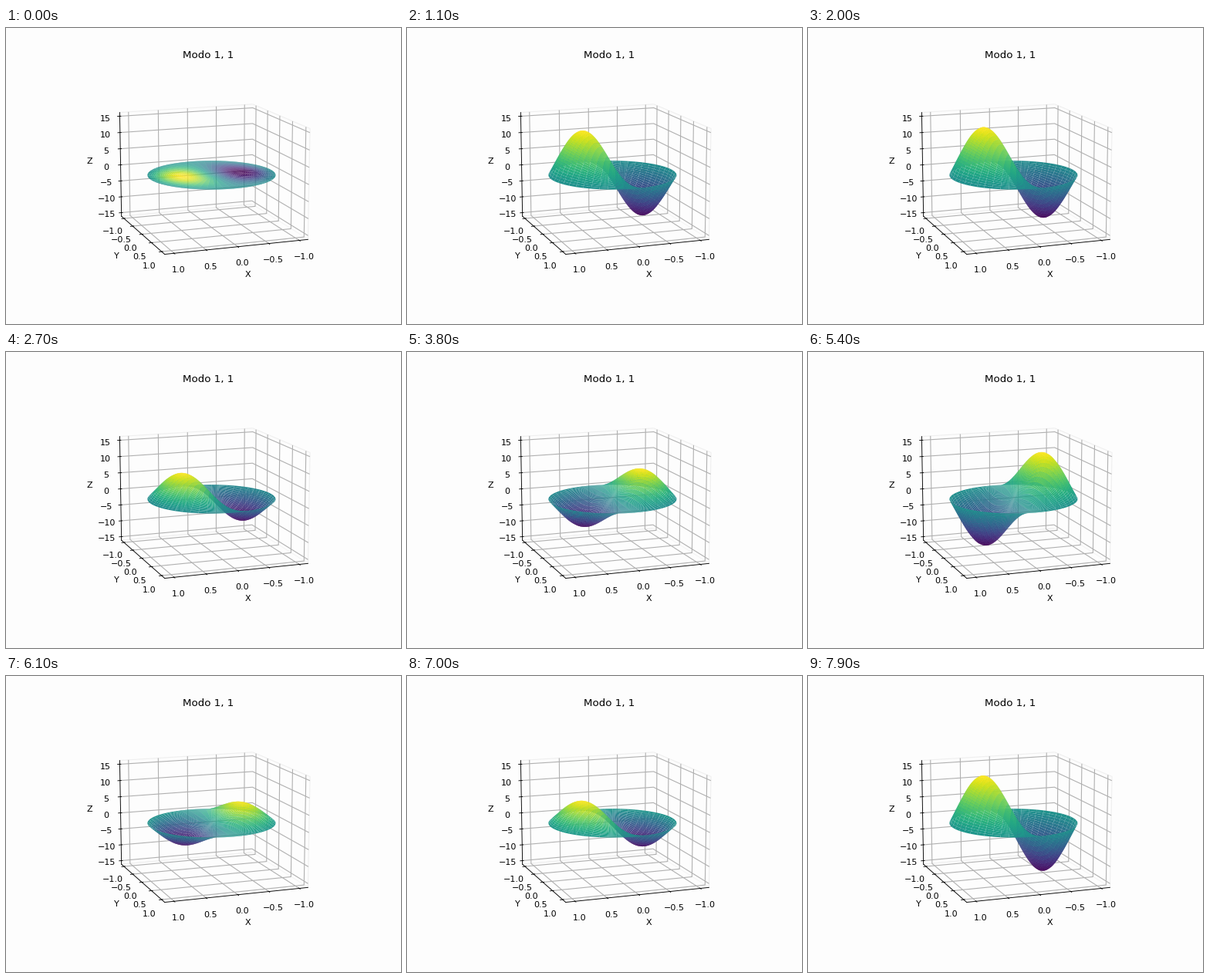
Recreate the animation shown at these times as a matplotlib script. Size 512x384 px, loop 8 s.

```python
import numpy as np
import matplotlib.pyplot as plt
from matplotlib.animation import FuncAnimation

FRAMES, INTERVAL = 80, 100
ROOTS = (2.4048, 3.8317)   # first zeros of J0 and J1
SPEED = 0.0969 / ROOTS[1]  # wave speed per frame
PAD = 25 / 24              # room around the axis limits
BACK = "#fdfdfd"

plt.rcParams.update({"text.hinting": "force_autohint",
                     "text.hinting_factor": 8,
                     "grid.linewidth": 1.0})


def bessel(m, x):
    """J_m from its integral form."""
    tau = (np.arange(200) + 0.5) * np.pi / 200
    return np.cos(m * tau - x[..., None] * np.sin(tau)).mean(axis=-1)


def mode(m, peak):
    """Drum mode of order m, scaled to its largest displacement."""
    shape = bessel(m, ROOTS[m] * r) * np.cos(m * theta)
    return peak * shape / shape.max()


def cells(grid):
    """Corner values of every mesh cell, in perimeter order."""
    return np.stack([grid[:-1, :-1], grid[:-1, 1:], grid[1:, 1:], grid[1:, :-1]],
                    axis=-1).reshape(-1, 4)


r, theta = np.meshgrid(np.linspace(0, 1, 50), np.linspace(0, 2 * np.pi, 50))
X, Y = r * np.cos(theta), r * np.sin(theta)
modes = mode(0, 0.63), mode(1, 15.22)
quad_x, quad_y = cells(X), cells(Y)
quad_modes = [cells(shape) for shape in modes]

fig = plt.figure(figsize=(6.4, 4.8), dpi=80, facecolor=BACK)
ax = fig.add_subplot(projection="3d", facecolor=BACK)
ax.view_init(elev=13, azim=70)
surf = ax.plot_surface(X, Y, modes[1], cmap="viridis")

ax.set_title("Modo 1, 1")
ax.set(xlabel="X", ylabel="Y", zlabel="Z",
       xlim=(-1.1 * PAD, 1.1 * PAD),
       ylim=(-1.1 * PAD, 1.1 * PAD),
       zlim=(-15.5 * PAD, 15.5 * PAD))
for axis in (ax.xaxis, ax.yaxis, ax.zaxis):
    axis.set_pane_color(BACK)
    axis.pane.set_edgecolor("#efefef")


def update(i):
    # the small offset keeps the colour scale defined at rest
    t = SPEED * (i + 0.01)
    z = sum(q * np.sin(k * t) for q, k in zip(quad_modes, ROOTS))
    height = z.mean(axis=1)
    surf.set_verts(np.stack([quad_x, quad_y, z], axis=-1))
    surf.set_array(height)
    surf.set_clim(height.min(), height.max())
    return [surf]


anim = FuncAnimation(fig, update, frames=FRAMES, interval=INTERVAL,
                     init_func=lambda: update(0), repeat=True, repeat_delay=0)
plt.show()
```
